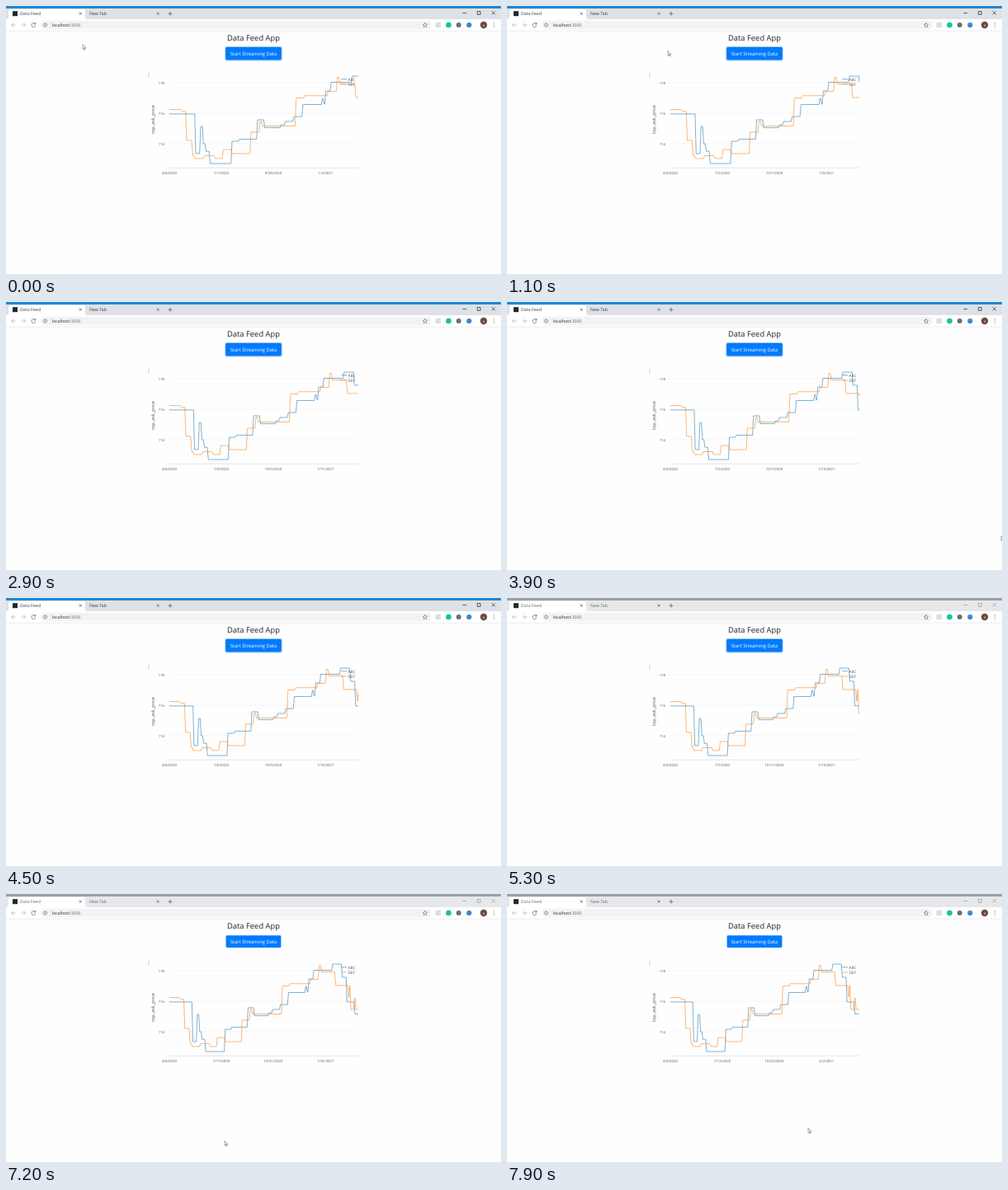
These frames come from a looping animation (600x325 px, 8000 ms). An HTML page:

```html
<!DOCTYPE html>
<html lang="en">
<head>
<meta charset="utf-8">
<title>Data Feed</title>
<style>
html, body { margin: 0; width: 100%; height: 100%; overflow: hidden; background: #fff; }
svg { display: block; width: 600px; height: 325px; }
text { font-family: "Open Sans", "Noto Sans", sans-serif; text-rendering: geometricPrecision; }
.line { fill: none; stroke-width: .75; stroke-linejoin: round; opacity: .75; }
.blue { stroke: #1f77b4; }
.orange { stroke: #ff7f0e; }
.axis text { font-size: 4.3px; fill: #555; }
.icon { fill: none; stroke: #5f6368; stroke-width: .8; }
.mid { text-anchor: middle; }
#frame { fill: #1f86d6; }
#strip { fill: #dee1e6; }
#controls { stroke: #333; }
#tabs { fill: #3c4043; }
.blurred #frame { fill: #9b9ea3; }
.blurred #strip { fill: #e6e8eb; }
.blurred #controls { stroke: #a0a2a5; }
.blurred #tabs { fill: #6a6e73; }
</style>
</head>
<body>
<svg id="stage" viewBox="0 0 600 325">
  <rect width="600" height="325" fill="#fefefe"/>

  <!-- browser window -->
  <rect id="strip" width="600" height="16"/>
  <rect id="frame" width="600" height="3"/>
  <path d="M1 16Q3 16 3 14V6Q3 4 5 4H94Q96 4 96 6V14Q96 16 98 16Z" fill="#fff"/>
  <rect x="8" y="6.2" width="6" height="6" fill="#1b2b30"/>
  <g id="tabs" font-size="5.3">
    <text x="17" y="11.3">Data Feed</text>
    <text x="101" y="11.3">New Tab</text>
  </g>
  <path class="icon" d="M88.8 7.7l3 3m0-3l-3 3M182.6 7.7l3 3m0-3l-3 3M196.5 9.3h5m-2.5-2.5v5"/>
  <path id="controls" class="icon" d="M553.5 8.5h4.5M571.3 6.5h3.8v3.8h-3.8zM588.8 6.4l4 4m0-4l-4 4"/>
  <rect y="16" width="600" height="14" fill="#fff"/>
  <rect x="42" y="17.7" width="474" height="10.6" rx="5.3" fill="#f1f3f4"/>
  <path d="M0 30.2H600" stroke="#e2e3e5" stroke-width=".6"/>
  <path class="icon" style="stroke:#b4b6b9" d="M11.5 23H6.5m2.3-2.4L6.4 23l2.4 2.4M18.5 23h5m-2.3-2.4l2.4 2.4-2.4 2.4"/>
  <path class="icon" d="M35.3 21.5a2.4 2.4 0 1 0 .5 2.1M35.9 20v2h-2"/>
  <path class="icon" style="stroke-width:.6" d="M45.4 23a2.1 2.1 0 1 0 4.2 0a2.1 2.1 0 1 0-4.2 0M47.5 22.7v1.4m0-2.5v.5"/>
  <text x="56" y="24.9" font-size="5.1" fill="#202124">localhost<tspan fill="#5f6368">:3000</tspan></text>
  <path class="icon" style="stroke-width:.6" d="M508 20.3l.8 1.8 2 .2-1.5 1.3.4 2-1.7-1-1.7 1 .4-2-1.5-1.3 2-.2z"/>
  <rect x="520.5" y="19.7" width="6.6" height="6.6" rx="1" fill="#dcdee0"/>
  <circle cx="536.5" cy="23" r="3.3" fill="#15c39a"/>
  <circle cx="548.7" cy="23" r="3" fill="#6b6e72"/>
  <circle cx="561.3" cy="23" r="3.1" fill="#3b86d8"/>
  <circle cx="579" cy="23" r="4.2" fill="#6d4c41"/>
  <text class="mid" x="579" y="24.5" font-size="4.6" fill="#fff">s</text>
  <path d="M591.5 20.8v.01m0 2.2v.01m0 2.2v.01" stroke="#5f6368" stroke-width="1.1" stroke-linecap="round"/>

  <!-- page -->
  <text class="mid" x="300" y="41.8" font-size="9.4" fill="#212529">Data Feed App</text>
  <rect id="ring" x="265.3" y="49" width="69.4" height="17.4" rx="2.2" fill="#8fc4ff"/>
  <rect x="266.6" y="50.3" width="66.8" height="14.8" rx="1.4" fill="#007bff"/>
  <rect id="edge" x="266.9" y="50.6" width="66.2" height="14.2" rx="1.2" fill="none" stroke="#0062cc" stroke-width=".6"/>
  <text class="mid" x="300" y="59.9" font-size="5.87" fill="#fff">Start Streaming Data</text>

  <!-- chart -->
  <path d="M173 81.6v.01m0 2v.01m0 2v.01" stroke="#777" stroke-width=".9" stroke-linecap="round"/>
  <text class="mid" transform="translate(180.3 137.5) rotate(-90)" font-size="5.5" fill="#555">top_ask_price</text>
  <path d="M198 93H427M198 130H427M198 167H427" stroke="#ececec" stroke-width=".6"/>
  <path d="M198 196.3H427" stroke="#d8dade" stroke-width=".7"/>
  <g class="axis" text-anchor="end">
    <text x="192" y="94.5">118</text>
    <text x="192" y="131.5">116</text>
    <text x="192" y="168.5">114</text>
  </g>
  <g class="axis mid">
    <text x="198" y="203.7">4/6/2020</text>
    <text class="date" x="261" y="203.7"></text>
    <text class="date" x="324" y="203.7"></text>
    <text class="date" x="387.3" y="203.7"></text>
  </g>
  <path id="abc" class="line blue"/>
  <path id="def" class="line orange"/>
  <path class="line blue" d="M406.3 88.7h6.8"/>
  <path class="line orange" d="M406.3 95h6.8"/>
  <g font-size="4.6" fill="#555">
    <text x="414.6" y="90.5">ABC</text>
    <text x="414.6" y="96.8">DEF</text>
  </g>

  <path id="cursor" d="M0 0V5.6L1.3 4.4 2.2 6.5 3.1 6.1 2.2 4.1H4Z" fill="#fff" stroke="#444" stroke-width=".5"/>
</svg>
<script>
const LOOP = 8000, LEFT = 198, WIDTH = 229, RISE = 1.3;
const $ = id => document.getElementById(id);
const dates = document.querySelectorAll(".date");

// each price holds from its position until the next one
const abc = [
  [0, 115.95], [32, 113.35], [38, 115.13], [41.3, 114], [44.5, 113.5], [49.5, 112.7],
  [76, 114.16], [85, 114.3], [107, 115.57], [115.7, 115.05], [135.5, 115.24], [140.5, 115.46],
  [151, 115.78], [162, 116.57], [185.5, 116.97], [187.6, 116.6], [189.7, 117.46], [196.3, 118.03],
  [222, 118.43], [235, 117.57], [241.5, 115.95], [252.3, 115.16]
];
const def = [
  [0, 116.24], [15, 116.12], [21, 114.22], [28.3, 113.24], [31, 113.03], [42.5, 113.22],
  [55.5, 113.03], [65.3, 113.62], [76, 113.35], [99, 114.76], [110, 115.47], [113, 115.16],
  [153.7, 117], [164, 117.15], [192.5, 117.43], [203.7, 118.35], [207, 117.92], [226, 117.03],
  [244, 116.27], [245.4, 117.03], [246.7, 115.46], [252, 116.2], [254, 115.46]
];

// time, share of the new rows received
const feed = [[0, 0], [1100, .18], [5300, .63], [6400, .9], [7900, 1]];

// time, x, y of the pointer; it leaves by the lower right corner and returns from below
const route = [
  [0, 93, 46.7], [400, 93, 46.7], [1100, 195, 54.5], [2700, 455, 235], [3500, 565, 311],
  [3900, 599, 284], [4000, 610, 330], [5400, 300, 330], [5900, 265, 299.5],
  [7300, 265, 299.5], [7900, 365, 284]
];

function at(keys, t) {
  let i = 1;
  while (i < keys.length - 1 && keys[i][0] < t) i++;
  const a = keys[i - 1], b = keys[i];
  const k = Math.min(1, (t - a[0]) / (b[0] - a[0]));
  return a.map((v, j) => v + (b[j] - v) * k);
}

function plot(steps, span) {
  const corners = steps.flatMap(([x, price], i) => {
    const next = steps[i + 1]?.[0] ?? LOOP;
    return [[x, price], [Math.max(x, next - RISE), price]];
  });
  const shown = corners.filter(([x]) => x < span);
  shown.push(at(corners, span));
  return "M" + shown.map(([x, price]) =>
    `${(LEFT + x * WIDTH / span).toFixed(2)} ${(93 + (118 - price) * 18.5).toFixed(2)}`).join("L");
}

function dateText(days) {
  const d = new Date(Date.UTC(2020, 3, 6 + Math.round(days)));
  return `${d.getUTCMonth() + 1}/${d.getUTCDate()}/${d.getUTCFullYear()}`;
}

function draw(now) {
  const t = Math.floor(now % LOOP / 100) * 100;
  const [, share] = at(feed, t);
  const span = WIDTH + 29.2 * share;
  $("abc").setAttribute("d", plot(abc, span));
  $("def").setAttribute("d", plot(def, span));

  const drift = share ** 1.3;
  [86 + 11 * drift, 175 + 24 * drift, 271 + 31 * drift]
    .forEach((days, i) => dates[i].textContent = dateText(days));

  const [, x, y] = at(route, t);
  $("cursor").setAttribute("transform", `translate(${x} ${y})`);
  $("cursor").style.display = t >= 2800 && t < 3000 ? "none" : "";

  $("stage").classList.toggle("blurred", t >= 5000);
  for (const id of ["ring", "edge"]) $(id).style.display = t < 5700 ? "" : "none";
}

let start;
function tick(now) {
  start ??= now;
  draw(now - start);
  requestAnimationFrame(tick);
}
draw(0);
requestAnimationFrame(tick);
</script>
</body>
</html>
```
